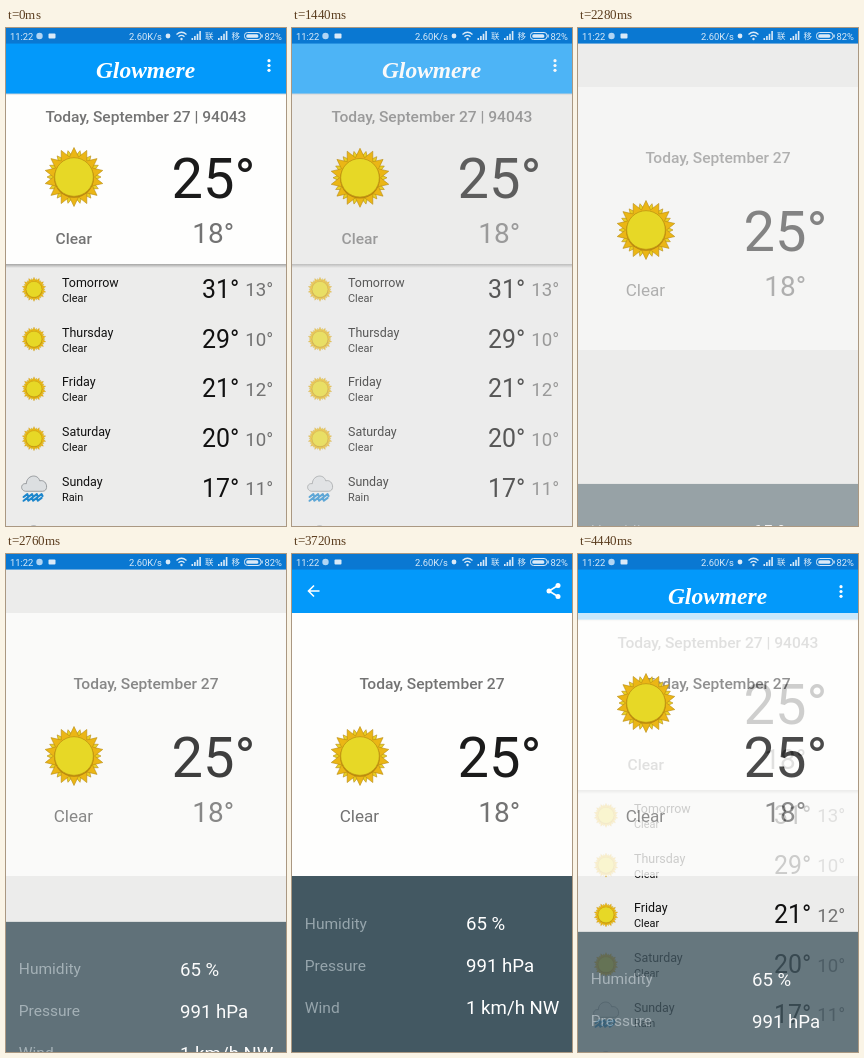
These frames come from a looping animation (280x498 px, 4.56 s). An HTML page:

```html
<!DOCTYPE html>
<html lang="en">
<head>
<meta charset="utf-8">
<title>Weather</title>
<style>
  html, body { margin: 0; width: 100%; height: 100%; overflow: hidden; background: #ececeb; }
  svg { display: block; width: 280px; height: 498px; }
  text { font-family: Roboto, sans-serif; white-space: pre; }
  .brand { font: italic bold 23.500px "Liberation Serif", serif; }
  .cjk { font-family: "Noto Sans CJK SC", "Noto Sans CJK", sans-serif; }
</style>
</head>
<body>
<svg id="stage" viewBox="0 0 280 498">
  <defs>
    <linearGradient id="shade" x1="0" y1="0" x2="0" y2="1">
      <stop offset="0" stop-color="#000" stop-opacity=".3"/>
      <stop offset="1" stop-color="#000" stop-opacity="0"/>
    </linearGradient>
    <clipPath id="cardClip"><rect y="65.600" width="280" height="170.400"/></clipPath>
    <g id="sunArt"></g>
    <g id="rainArt">
      <path d="M-9 3 C-15 2 -14 -6 -8 -5 C-8 -14 4 -16 6 -8 C14 -10 16 3 9 3 Z"
            fill="#dcdfe1" stroke="#8b8f92" stroke-width=".9"/>
      <path d="M-11 9 l4 -3 l1 3 l4 -3 l1 3 l4 -3 l1 3 l4 -3 l1 2 M-11 13 l4 -3 l1 3 l4 -3 l1 3 l4 -3 l1 3 l4 -3"
            fill="none" stroke="#1c86cc" stroke-width="2.200" stroke-linecap="round" stroke-linejoin="round"/>
    </g>
    <g id="signal" fill="#fff">
      <rect x="0" y="7" width="1.600" height="2"/>
      <rect x="2.600" y="5" width="1.600" height="4"/>
      <rect x="5.200" y="2.800" width="1.600" height="6.200"/>
      <rect x="7.800" y="0" width="1.600" height="9"/>
    </g>
  </defs>

  <g id="list">
    <rect width="280" height="498" fill="#ececeb"/>
    <g id="rows"></g>
    <rect y="236" width="280" height="4" fill="url(#shade)"/>
    <rect y="65" width="280" height="171" fill="#fefefd"/>
    <g id="press" clip-path="url(#cardClip)">
      <rect y="65" width="280" height="171" fill="#f8f8f7"/>
      <circle id="ripple" cx="168" cy="163" fill="#ebebea"/>
    </g>
    <g id="today"></g>
    <rect width="280" height="65.600" fill="#0399fa"/>
    <rect y="65.600" width="280" height="2" fill="url(#shade)" opacity=".5"/>
    <text class="brand" x="139.500" y="50" text-anchor="middle" fill="#fff">Glowmere</text>
    <g fill="#fff">
      <circle cx="263" cy="32.700" r="1.600"/><circle cx="263" cy="37.500" r="1.600"/><circle cx="263" cy="42.300" r="1.600"/>
    </g>
  </g>

  <rect id="cover" width="280" height="498" fill="#ececeb"/>

  <g id="card"><rect y="59" width="280" height="263" fill="#fefefd"/></g>
  <g id="panel"><rect y="322" width="280" height="176" fill="#435862"/></g>

  <g id="bar">
    <rect width="280" height="59" fill="#0399fa"/>
    <path d="M27.500 37 H16.500 M22 31.500 L16.500 37 L22 42.500" fill="none" stroke="#fff" stroke-width="1.600"/>
    <path d="M266 31.500 L257 37 L266 42.500" fill="none" stroke="#fff" stroke-width="1.600"/>
    <g fill="#fff">
      <circle cx="257" cy="37" r="2.500"/><circle cx="266" cy="31.500" r="2.500"/><circle cx="266" cy="42.500" r="2.500"/>
    </g>
  </g>

  <use id="sun" href="#sunArt"/>

  <rect width="280" height="15.560" fill="#0a78d2"/>
  <g id="status" opacity=".85">
    <circle cx="33.500" cy="8" r="3.200" fill="#cfe6fa"/>
    <rect x="42.500" y="5.500" width="7" height="5" rx="1" fill="#fff"/>
    <circle cx="162" cy="8" r="2.400" fill="#fff"/>
    <g fill="none" stroke="#fff" stroke-width="1.300">
      <path d="M170.500 6.500 q5 -4.500 10 0 M172.500 8.700 q3 -2.600 6 0"/>
      <rect x="238.500" y="4.500" width="16.500" height="7" rx="3" stroke-width="1"/>
    </g>
    <circle cx="175.500" cy="11" r="1.200" fill="#fff"/>
    <rect x="240.300" y="6.200" width="12" height="3.600" rx="1.500" fill="#fff"/>
    <rect x="255.500" y="6.500" width="1.200" height="3" fill="#fff"/>
    <use href="#signal" x="185.500" y="3"/>
    <use href="#signal" x="212" y="3"/>
  </g>
</svg>

<script>
const LOOP = 4560, STEP = 120;
const INK = '#1b1b1b', GREY = '#737373';
const $ = id => document.getElementById(id);

function add(parent, tag, attrs, content) {
  const el = document.createElementNS('http://www.w3.org/2000/svg', tag);
  for (const key in attrs) el.setAttribute(key, attrs[key]);
  if (content) el.textContent = content;
  parent.appendChild(el);
  return el;
}

function label(parent, content, x, y, size, fill, more) {
  return add(parent, 'text', { x, y, 'font-size': size, fill, ...more }, content);
}

function star(count, outer, inner, turn) {
  const points = [];
  for (let i = 0; i < count * 2; i++) {
    const a = Math.PI * i / count + turn, r = i % 2 ? inner : outer;
    points.push((r * Math.sin(a)).toFixed(2) + ',' + (-r * Math.cos(a)).toFixed(2));
  }
  return points.join(' ');
}

function buildSun() {
  const g = $('sunArt'), line = { stroke: '#b88a12', 'stroke-width': .6 };
  add(g, 'polygon', { points: star(14, 27, 19, Math.PI / 14), fill: '#e9cf22', ...line });
  add(g, 'polygon', { points: star(14, 29.5, 20.5, 0), fill: '#ebb615', ...line });
  add(g, 'circle', { cy: .8, r: 20, fill: '#b8860f' });
  add(g, 'circle', { r: 19.3, fill: '#e7d826', stroke: '#c39a14', 'stroke-width': .8 });
}

function buildRows() {
  const g = $('rows');
  const days = [
    ['Tomorrow', 'Clear', 31, 13], ['Thursday', 'Clear', 29, 10], ['Friday', 'Clear', 21, 12],
    ['Saturday', 'Clear', 20, 10], ['Sunday', 'Rain', 17, 11], ['Monday', 'Rain', 18, 11]
  ];
  days.forEach(([day, sky, high, low], i) => {
    const y = 261.3 + i * 49.78;
    const art = sky === 'Clear' ? ['#sunArt', .41] : ['#rainArt', .95];
    add(g, 'use', { href: art[0], transform: `translate(28 ${y}) scale(${art[1]})` });
    label(g, day, 56, y - 2.5, 12.44, '#111');
    label(g, sky, 56, y + 12.5, 10.89, '#111');
    label(g, high + '°', 196, y + 8.5, 24.9, '#111');
    label(g, low + '°', 239.3, y + 7, 18.67, GREY);
  });
}

function buildSummary(g, dy, date, sky) {
  label(g, date[0], 140, date[1], 15.56, GREY, { 'text-anchor': 'middle', 'font-weight': 500 });
  label(g, 'Clear', sky[0], sky[1], sky[2], GREY, { 'font-weight': sky[3] });
  label(g, '25°', 165.5, 170.4 + dy, 56, INK);
  label(g, '18°', 186.3, 215.4 + dy, 28, GREY);
}

function buildPanel() {
  [['Humidity', '65 %'], ['Pressure', '991 hPa'], ['Wind', '1 km/h NW']].forEach(([name, value], i) => {
    label($('panel'), name, 12.8, 374.5 + i * 42, 15.56, '#96a5ac');
    label($('panel'), value, 174, 376 + i * 42, 18.67, '#fff');
  });
}

function buildStatus() {
  const g = $('status');
  label(g, '11:22', 4, 11.7, 9.4, '#fff');
  label(g, '2.60K/s', 123, 11.7, 9.4, '#fff');
  label(g, '82%', 258.5, 11.7, 9.4, '#fff');
  label(g, '联', 199, 11.3, 8.5, '#fff', { class: 'cjk' });
  label(g, '移', 225.5, 11.3, 8.5, '#fff', { class: 'cjk' });
}

const ramp = (t, from, to) => Math.min(1, Math.max(0, (t - from) / (to - from)));

// cubic-bezier(.4, 0, .2, 1), solved for x by bisection
function ease(x) {
  let lo = 0, hi = 1, s = x;
  for (let i = 0; i < 24; i++) {
    s = (lo + hi) / 2;
    const bx = 1.2 * s * (1 - s) ** 2 + .6 * s * s * (1 - s) + s ** 3;
    if (bx < x) lo = s; else hi = s;
  }
  return 3 * s * s * (1 - s) + s ** 3;
}

function draw(t) {
  const shown = ramp(t, 1560, 3010) - ramp(t, 4200, 5343);
  const cover = ramp(t, 1320, 1700) - ramp(t, 4200, 4400);
  const moved = ease(ramp(t, 1400, 1920)) - ease(ramp(t, 4200, 4440));
  const pressed = t >= 720 && t < 1800;

  $('press').style.display = pressed ? '' : 'none';
  $('ripple').setAttribute('r', Math.min(200, Math.max(0, (t - 720) * .375)));
  $('cover').setAttribute('opacity', cover);
  $('card').setAttribute('opacity', shown);
  $('panel').setAttribute('opacity', shown);
  $('panel').setAttribute('transform', `translate(0 ${266 * (1 - shown)})`);
  $('bar').style.display = t >= 3000 && t <= 4200 ? '' : 'none';
  $('sun').setAttribute('transform', `translate(68 ${149 + 53 * moved})`);
}

buildSun();
buildRows();
buildSummary($('today'), 0, ['Today, September 27 | 94043', 94.2], [49.5, 215.7, 15.56, 500]);
buildSummary($('card'), 52.9, ['Today, September 27', 134.5], [47.7, 268.4, 17.11, 400]);
buildPanel();
buildStatus();

const start = performance.now();
function tick() {
  const t = (performance.now() - start) % LOOP;
  draw(Math.floor(t / STEP) * STEP);
  requestAnimationFrame(tick);
}
tick();
</script>
</body>
</html>
```
